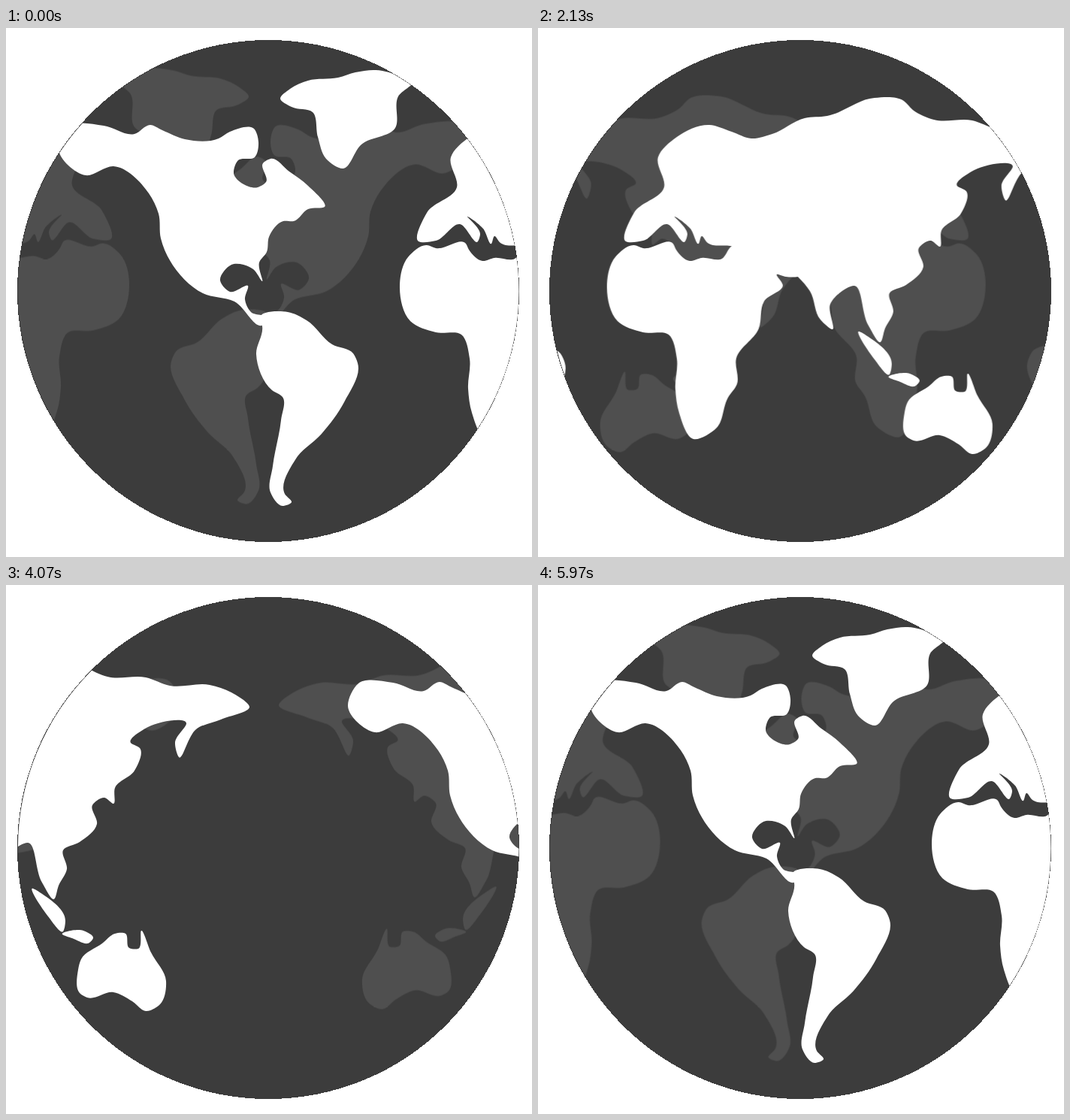
Recreate the animation shown at these times as an HTML page. Size 700 px wide and 704 px high, loop 6010 ms.

```html
<!DOCTYPE html>
<html lang="en">
<head>
<meta charset="utf-8">
<title>Turning globe</title>
<style>
  html, body { margin: 0; width: 100%; height: 100%; overflow: hidden; background: #fff; }
  svg { display: block; }
  .disc { fill: #3c3c3c; shape-rendering: crispEdges; }
  .near { fill: #fff; --turn: -1209px; }
  .far { fill: #4f4f4f; --turn: -1207.5px; }
  .spin { animation: spin 6010ms -5ms infinite; }
  /* 179 even steps at 30 per second, then one step of rest */
  @keyframes spin {
    0% { transform: translateX(0); animation-timing-function: steps(179); }
    99.285%, 100% { transform: translateX(var(--turn)); }
  }
</style>
</head>
<body>
<svg width="700" height="704" viewBox="0 0 700 704">
  <defs>
    <clipPath id="rim"><circle cx="349.2" cy="350" r="333.3"/></clipPath>
    <g id="map"></g>
  </defs>
  <circle class="disc" cx="349" cy="350" r="334"/>
  <g clip-path="url(#rim)">
    <g class="far" transform="translate(688 -2.5) scale(-1 1)">
      <g class="spin"><use href="#map"/><use href="#map" x="1209"/></g>
    </g>
    <g class="near">
      <g class="spin"><use href="#map"/><use href="#map" x="1209"/></g>
    </g>
  </g>
</svg>
<script>
const map = document.getElementById('map');

const gap = (a, b) => Math.hypot(b[0] - a[0], b[1] - a[1]);

// Tangent at b, close to that of the circle through a, b and c
function slope(a, b, c) {
  const before = gap(a, b), after = gap(b, c);
  return b.map((v, k) =>
    ((v - a[k]) * after / before + (c[k] - v) * before / after) / (before + after));
}

// Closed round curve through a few key points
function coast(points) {
  const at = i => points[(i + points.length) % points.length];
  const tangents = points.map((p, i) => slope(at(i - 1), p, at(i + 1)));
  return 'M' + points[0] + points.map((p, i) => {
    const next = at(i + 1), reach = gap(p, next) / 3;
    const leave = tangents[i], arrive = tangents[(i + 1) % points.length];
    return 'C' + [
      p.map((v, k) => v + leave[k] * reach),
      next.map((v, k) => v - arrive[k] * reach),
      next
    ].join(' ');
  }).join('') + 'Z';
}

function land(dx, text) {
  const points = text.trim().split(/\s+/).map(p => p.split(',').map(Number));
  const path = document.createElementNS('http://www.w3.org/2000/svg', 'path');
  path.setAttribute('d', coast(points.map(([x, y]) => [x + dx, y])));
  map.append(path);
}

// North America
land(0, `70,161 84,131 130,130 171,141 192,129 208,136 238,148 283,147 298,138
  330,134 336,152 331,172 309,176 303,193 335,212 346,205 342,180 352,174
  377,191 402,210 424,238 402,241 383,257 369,257 350,278 347,298 337,312
  341,337 329,321 300,315 285,336 298,351 322,343 318,361 326,378 350,386
  342,395 304,364 262,353 206,280 203,247 190,220 143,184 106,196`);

// South America
land(0, `338,386 375,378 400,389 434,421 462,433 468,446 450,498 420,540 386,573
  371,620 380,631 368,636 352,618 355,583 366,522 368,491 354,482 333,434 341,397`);

// Greenland
land(230, `135,94 148,81 172,70 212,66 235,59 262,56 297,65 311,71 292,91 288,133
  243,155 218,187 196,174 185,145 178,112 150,105`);

// Africa and Arabia
land(230, `294,346 305,305 330,289 342,293 382,287 386,295 404,310 420,306 447,307
  459,291 500,280 548,331 532,331 520,328 528,342 503,364 496,400 466,440 467,474
  455,492 440,532 409,547 390,512 385,480 387,440 376,408 342,405 308,390`);

// Europe and Asia
land(432, `228,129 258,138 284,147 312,141 355,120 385,117 448,93 487,97 499,109
  527,122 578,123 610,134 663,133 692,143 716,162 678,179 645,192 622,229
  617,210 632,184 581,189 558,210 570,217 563,247 537,270 535,291 523,283
  507,293 513,318 490,342 468,353 473,378 462,400 456,418 440,396 421,343
  389,368 392,401 376,388 362,350 346,331 300,300 256,290 226,286 218,277
  214,287 203,267 182,251 199,275 196,284 172,261 140,283 117,284 128,246
  168,212 160,172 185,145`);

// Sumatra, Java, Australia
land(432, `428,404 440,411 471,447 468,461 448,441`);
land(432, `467,465 495,460 508,470 503,476 480,470`);
land(432, `488,512 492,498 520,477 537,464 551,464 556,483 568,484 572,460 585,489
  605,527 597,558 578,567 560,554 535,542 500,549 491,544`);
</script>
</body>
</html>
```
